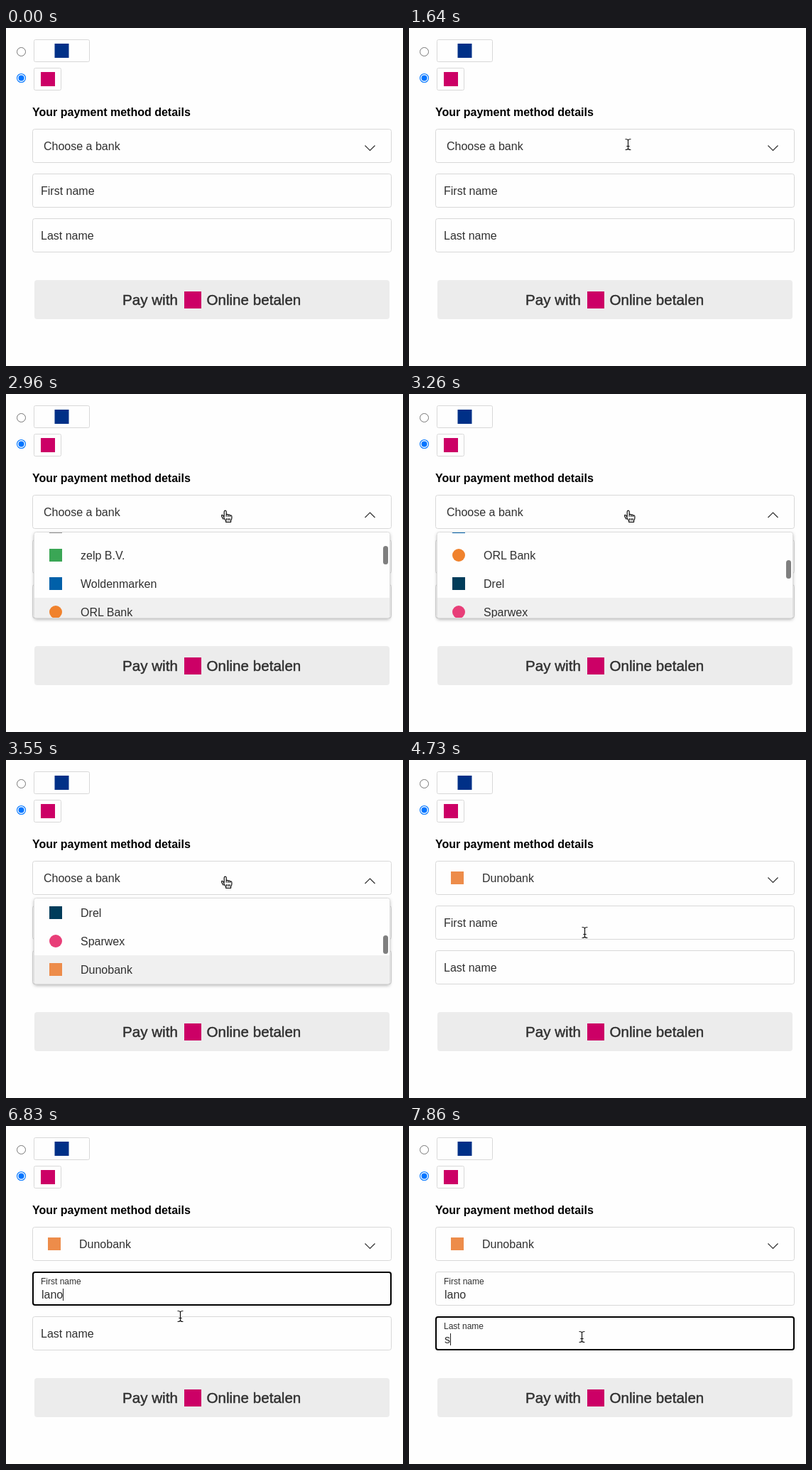
Animation of 559x476 px, one loop 8000 ms. Source, as an HTML page:

```html
<!DOCTYPE html>
<html lang="en">
<head>
<meta charset="utf-8">
<title>Payment form</title>
<style>
html, body { margin: 0; width: 100%; height: 100%; overflow: hidden; background: #fefefe; }
svg { display: block; font: 16px "Liberation Sans", Arial, sans-serif; fill: #303030; }
.box { fill: #fefefe; stroke: #d8d8d8; stroke-width: 1; }
.head { font-weight: bold; fill: #000; }
.pay { font-size: 20.6px; stroke: #303030; stroke-width: .45; }
.line { fill: none; stroke: #2b2b2b; stroke-width: 1.15; }
#menu { filter: drop-shadow(0 2px 2px rgba(0,0,0,.26)); }
</style>
</head>
<body>
<svg id="stage" width="559" height="476" viewBox="0 0 559 476">
  <defs><clipPath id="view"><rect x="40" y="195" width="500" height="120" rx="2"/></clipPath></defs>

  <circle cx="21.5" cy="33.5" r="6" fill="#fff" stroke="#767676"/>
  <circle cx="21.5" cy="70.5" r="6" fill="#fff" stroke="#0075ff" stroke-width="1.1"/>
  <circle cx="21.5" cy="70.5" r="4" fill="#0075ff"/>
  <rect class="box" x="39.5" y="16.5" width="78" height="31" rx="2"/>
  <rect x="68.5" y="22" width="20" height="20" fill="#003087"/>
  <rect class="box" x="39.5" y="56.5" width="38" height="31" rx="2"/>
  <rect x="49" y="62" width="20" height="20" fill="#cc0066"/>

  <text class="head" x="37" y="124">Your payment method details</text>

  <rect class="box" x="37.5" y="142.5" width="505" height="47" rx="3"/>
  <text id="prompt" x="53" y="172">Choose a bank</text>
  <g id="chosen"></g>
  <path id="chevron" class="line"/>

  <g id="fields"></g>

  <rect x="40" y="355" width="500" height="55" rx="4" fill="#ececec"/>
  <text class="pay" x="164" y="390">Pay with</text>
  <rect x="251" y="371" width="24" height="24" fill="#cc0066"/>
  <text class="pay" x="282.5" y="390">Online betalen</text>

  <g id="menu">
    <rect x="39.5" y="194.5" width="501" height="121" rx="3" fill="#fefefe" stroke="#dedede"/>
    <g clip-path="url(#view)">
      <rect id="active" x="40" width="500" height="40" fill="#f0f0f0"/>
      <g id="list"></g>
    </g>
    <rect id="thumb" x="531" width="7" height="26" rx="3.5" fill="#7f7f7f"/>
  </g>

  <g id="beam" fill="none" stroke-linecap="round">
    <path id="beamEdge" stroke="#fff" stroke-width="2.6"/>
    <path id="beamCore" stroke="#111" stroke-width="1.2"/>
  </g>
  <path id="hand" fill="#fff" stroke="#111" stroke-width="1.2" stroke-linejoin="round"
    d="M-3.8 1.2V-5.8Q-3.6-7.4-2.3-7.4Q-1-7.4-.8-5.8V-1.6Q.5-3 1.8-1.2Q3.3-2.2 4.3-.6
       Q6.6-1.2 6.9 1.2V3.2Q6.8 5 5.6 6.4V8.8H-1.4V7.2Q-3.6 5-5-.1Q-7.8-2.4-7.4.6Q-6.4 3-4.6 5
       M-.8-1.6V1.2M1.8-1.2V1.4M4.3-.6V1.6M-.5 3.6V6.6M1.8 3.6V6.6M4 3.6V6.6"/>
</svg>
<script>
const LOOP = 8000;
const $ = id => document.getElementById(id);

function add(parent, tag, attrs, text) {
  const el = document.createElementNS("http://www.w3.org/2000/svg", tag);
  set(el, attrs);
  if (text) el.textContent = text;
  parent.append(el);
  return el;
}
function set(el, attrs) {
  for (const k in attrs) el.setAttribute(k, attrs[k]);
}
const show = (el, on) => set(el, { visibility: on ? "visible" : "hidden" });

// Value of the last [time, value] step already reached
function at(steps, t) {
  let v = steps[0][1];
  for (const s of steps) if (t >= s[0]) v = s[1];
  return v;
}

const banks = [
  ["VKL BRINO", "#00857a"], ["TWP Bank", "#8c8c8c"], ["zelp B.V.", "#3aa655"],
  ["Woldenmarken", "#0060a9"], ["ORL Bank", "#f0822d", true], ["Drel", "#003c5a"],
  ["Sparwex", "#e83e78", true], ["Dunobank", "#ed8c4a"], ["Quorfin", "#2b7fc3"],
  ["Heltra", "#5a3c8c"], ["Bolvers", "#c83c3c"], ["Wintorp Bank", "#22406a"]
];

function bankRow(parent, [name, fill, round], x, y) {
  if (round) add(parent, "circle", { cx: x + 17, cy: y, r: 9, fill });
  else add(parent, "rect", { x: x + 8, y: y - 9, width: 18, height: 18, fill });
  add(parent, "text", { x: x + 52, y: y + 6 }, name);
}
banks.forEach((b, i) => bankRow($("list"), b, 53, 215 + 40 * i));
bankRow($("chosen"), banks[7], 51, 166);

function field(label, y, steps) {
  const g = $("fields");
  return {
    y, ...steps,
    box: add(g, "rect", { class: "box", x: 37.5, y: y + .5, width: 505, height: 47, rx: 3 }),
    ring: add(g, "rect", { x: 38, y: y + 1, width: 504, height: 46, rx: 3, fill: "none", stroke: "#000", "stroke-width": 2 }),
    label: add(g, "text", { x: 49 }, label),
    value: add(g, "text", { x: 50, y: y + 38 }),
    bar: add(g, "rect", { y: y + 24, width: 1, height: 17, fill: "#222" })
  };
}
const fields = [
  field("First name", 205, {
    focus: [[0, 0], [4880, 1], [7130, 0]],
    lift: [[0, 0], [4880, .5], [5030, 1]],
    caret: [[0, 0], [5030, 1], [5480, 0], [5630, 1], [7130, 0]],
    typed: [[0, ""], [5630, "l"], [5930, "la"], [6380, "lan"], [6530, "lano"]]
  }),
  field("Last name", 268, {
    focus: [[0, 0], [7130, 1]],
    lift: [[0, 0], [7130, .5], [7270, 1]],
    caret: [[0, 0], [7270, 1], [7710, 0], [7860, 1]],
    typed: [[0, ""], [7860, "s"]]
  })
];

const scroll = [[0, 0], [2370, 8], [2520, 26], [2670, 38], [2810, 50], [2960, 68],
  [3110, 106], [3250, 148], [3400, 192], [3550, 200]];
const fade = [[0, 0], [1790, .6], [1930, 1], [3990, .8], [4140, .35], [4290, 0]];
const pointer = [[0, null], [440, ["beam", 283, 291]], [590, ["beam", 297, 232]],
  [740, ["hand", 310, 178]], [890, ["hand", 311, 171.5]], [1640, ["beam", 308.5, 164]],
  [1790, ["hand", 311, 171.5]], [4580, ["beam", 268, 218]], [4730, ["beam", 247.5, 243]],
  [4880, ["beam", 247.5, 241]], [6830, ["beam", 245.5, 268]], [6980, ["beam", 243.5, 297]]];

const beam = "M-3.5-7.5Q-.5-7.5 0-6Q.5-7.5 3.5-7.5M0-6V6M-3.5 7.5Q-.5 7.5 0 6Q.5 7.5 3.5 7.5M-1.7 2.5H1.7";
set($("beamEdge"), { d: beam });
set($("beamCore"), { d: beam });

function drawField(f, t) {
  const lift = at(f.lift, t), text = at(f.typed, t);
  show(f.ring, at(f.focus, t));
  set(f.label, { y: f.y + 30 - 12 * lift, "font-size": 16 - 4 * lift });
  f.value.textContent = text;
  show(f.bar, at(f.caret, t));
  set(f.bar, { x: 50 + (text ? Math.round(f.value.getComputedTextLength()) : 0) });
}

function draw(t) {
  const off = at(scroll, t), alpha = at(fade, t), picked = t >= 3990;
  const active = off ? 2 + Math.ceil(off / 40) : 0;
  show($("prompt"), !picked);
  show($("chosen"), picked);
  set($("chevron"), { d: alpha && !picked ? "M505.5 174L512.5 167L519.5 174" : "M505.5 165.5L512.5 172.5L519.5 165.5" });

  set($("menu"), { opacity: alpha });
  show($("menu"), alpha);
  set($("list"), { transform: `translate(0 ${-off})` });
  set($("active"), { y: 195 + 40 * active - off });
  set($("thumb"), { y: 197 + off / 4 });

  fields.forEach(f => drawField(f, t));

  const p = at(pointer, t);
  for (const id of ["beam", "hand"]) {
    const on = p && p[0] === id;
    show($(id), on);
    if (on) set($(id), { transform: `translate(${p[1]} ${p[2]})` });
  }
}

const start = performance.now();
function tick() {
  draw((performance.now() - start) % LOOP);
  requestAnimationFrame(tick);
}
tick();
</script>
</body>
</html>
```
